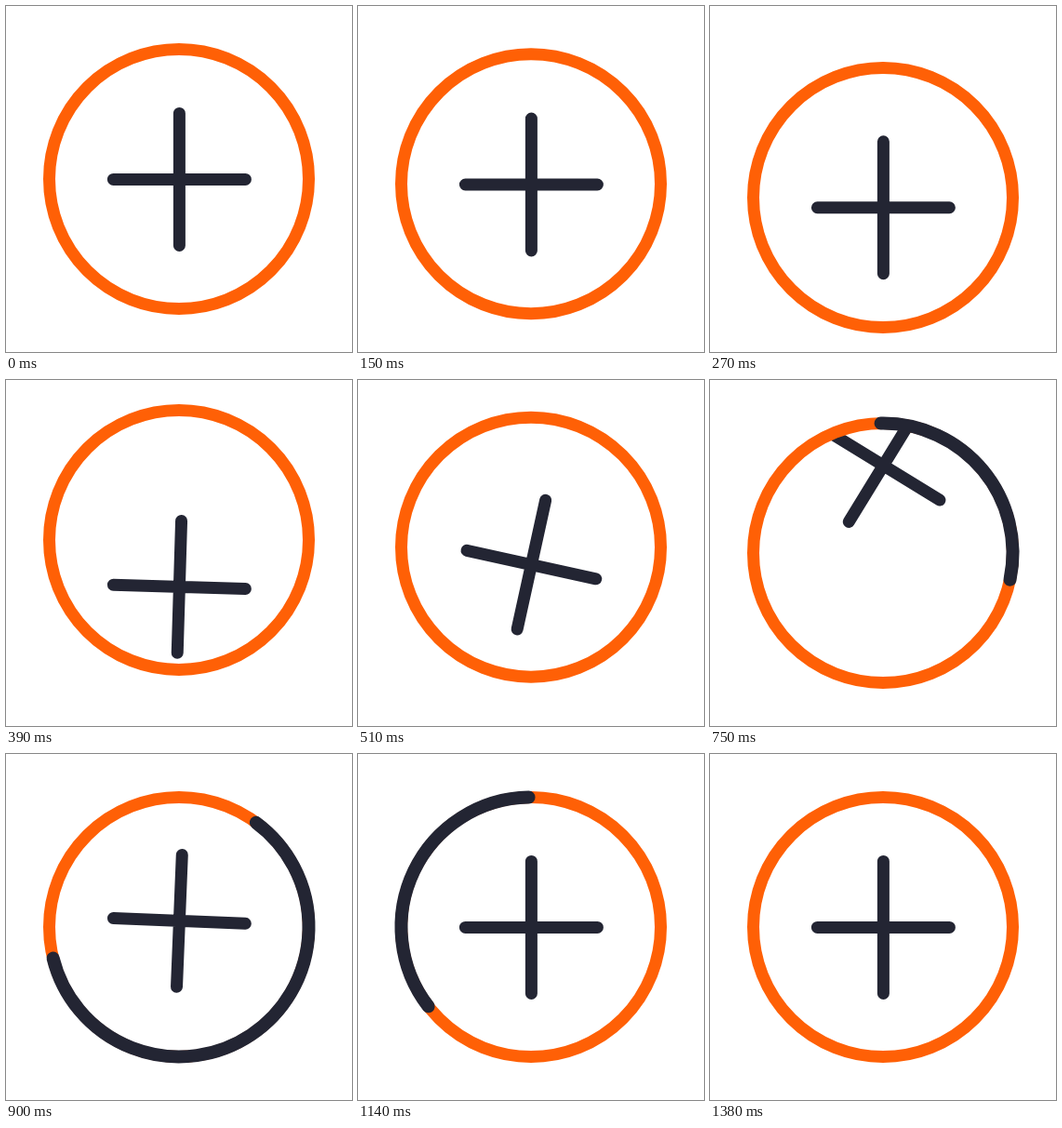
Animation, 372 px wide and 372 px high, one loop 1.5 s. Source, as an HTML page:

```html
<!DOCTYPE html>
<html lang="en">
<head>
<meta charset="utf-8">
<title>Plus button</title>
<style>
  html, body { margin: 0; width: 100%; height: 100%; overflow: hidden; background: #fff; }
  svg { display: block; width: 100vw; height: 100vh; }
  path, circle { fill: none; stroke: #232533; stroke-width: 13; stroke-linecap: round; }
  #ring { stroke: #ff6006; }
  #arc { stroke-width: 14; }
</style>
</head>
<body>
<svg viewBox="0 0 372 372">
  <clipPath id="inside"><circle id="hole" cx="186" cy="186" r="140"/></clipPath>
  <g clip-path="url(#inside)"><path id="plus" d="M-71 0H71M0 -71V71"/></g>
  <circle id="ring" cx="186" cy="186" r="139.5"/>
  <path id="arc"/>
</svg>
<script>
const LOOP = 1500, STEP = 30, CENTER = 186, RADIUS = 139.5;
const [hole, plus, ring, arc] = ['hole', 'plus', 'ring', 'arc'].map(id => document.getElementById(id));

// Tracks are lists of [time, value], eased in and out between neighbours.
const ringY = [[90, 0], [270, 20], [420, -18], [570, 0]];
const plusY = [[90, 0], [330, 36], [420, 36], [750, -94.5], [930, 0]];
const plusTurn = [[330, 0], [750, 31.5], [930, 0]];
const arcHead = [[570, -1], [1080, 359]];
const arcTail = [[780, -1], [1380, 359]];

function valueAt(track, t) {
  const next = track.findIndex(([time]) => time > t);
  if (next === 0) return track[0][1];
  if (next < 0) return track[track.length - 1][1];
  const [t0, v0] = track[next - 1], [t1, v1] = track[next];
  const x = (t - t0) / (t1 - t0);
  return v0 + (v1 - v0) * x * x * (3 - 2 * x);
}

function pointAt(degrees) {
  const a = degrees * Math.PI / 180;
  return `${CENTER + RADIUS * Math.sin(a)} ${CENTER - RADIUS * Math.cos(a)}`;
}

function arcPath(from, to) {
  if (to - from < 0.01) return '';
  const radii = `${RADIUS} ${RADIUS} 0 0 1`;
  const middle = (from + to) / 2;
  return `M${pointAt(from)}A${radii} ${pointAt(middle)}A${radii} ${pointAt(to)}`;
}

function draw(now) {
  const t = Math.floor(now % LOOP / STEP) * STEP;
  const y = CENTER + valueAt(ringY, t);
  ring.setAttribute('cy', y);
  hole.setAttribute('cy', y);
  plus.setAttribute('transform',
    `translate(186.4 ${186.4 + valueAt(plusY, t)}) rotate(${valueAt(plusTurn, t)})`);
  arc.setAttribute('d', arcPath(valueAt(arcTail, t), valueAt(arcHead, t)));
}

const start = performance.now();
function tick() {
  draw(performance.now() - start);
  requestAnimationFrame(tick);
}
tick();
</script>
</body>
</html>
```
